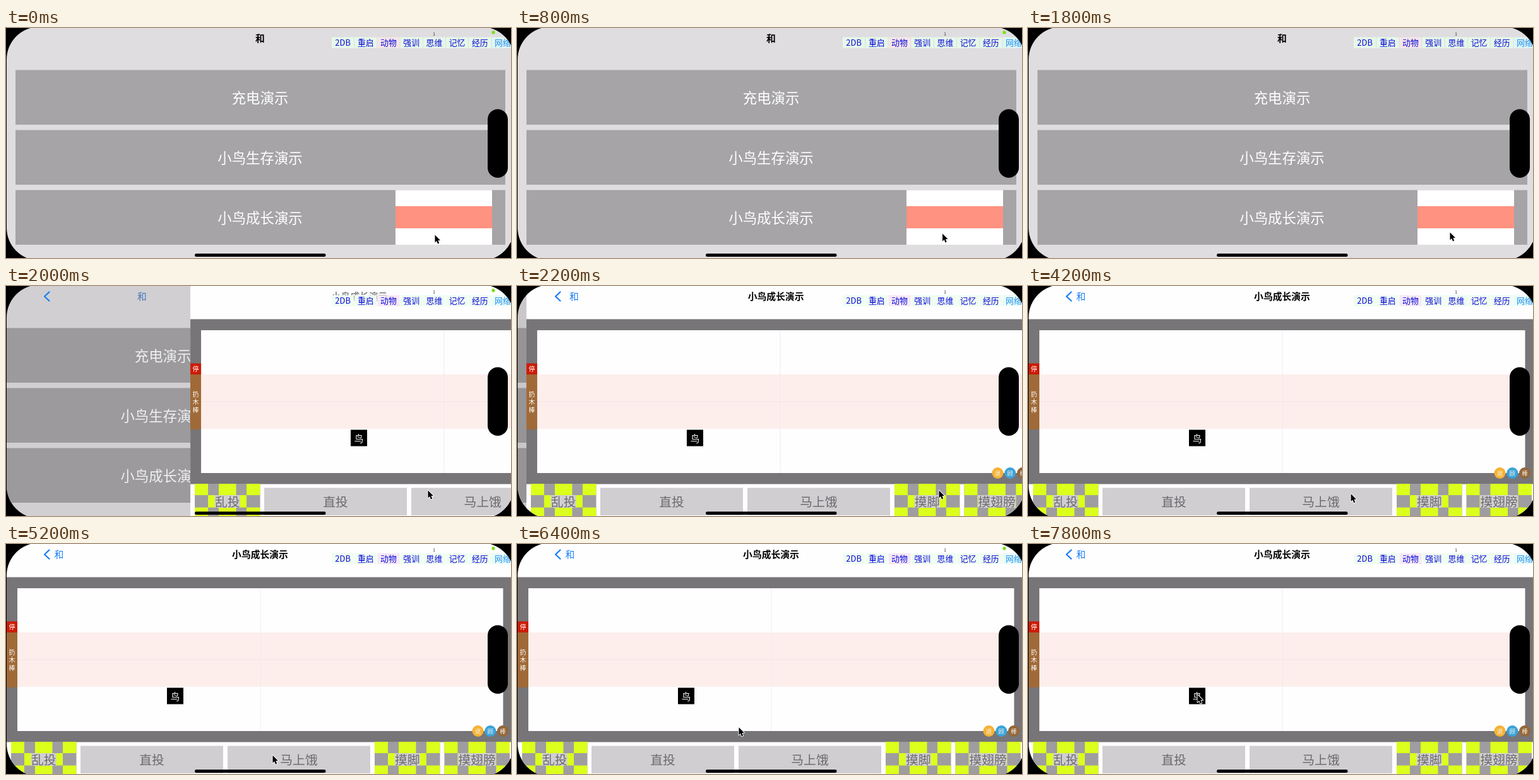
These frames come from a looping animation (800x364 px, 8000 ms). An HTML page with a canvas:

```html
<!DOCTYPE html>
<html lang="zh">
<head>
<meta charset="utf-8">
<style>
html, body { margin: 0; width: 100%; height: 100%; overflow: hidden; background: #000; }
canvas { display: block; }
</style>
</head>
<body>
<canvas id="stage" width="800" height="364"></canvas>
<script>
const ctx = document.getElementById('stage').getContext('2d');
const LOOP = 8000, STEP = 200, WIDTH = 804;
const FONT = '"Noto Sans CJK SC", "Noto Sans CJK", "Noto Sans CJK JP", sans-serif';
const BLUE = '#167df5', SILVER = '#d0ced1', LIME = '#dcff1c';

function rect(color, x, y, w, h) {
  ctx.fillStyle = color;
  ctx.fillRect(x, y, w, h);
}

function pill(x, y, w, h, r, color) {
  ctx.fillStyle = color;
  ctx.beginPath();
  ctx.roundRect(x, y, w, h, r);
  ctx.fill();
}

function disc(x, y, r, color) {
  ctx.fillStyle = color;
  ctx.beginPath();
  ctx.arc(x, y, r, 0, Math.PI * 2);
  ctx.fill();
}

// Text centred on both axes
function label(str, x, y, size, color, weight = 400) {
  ctx.font = `${weight} ${size}px ${FONT}`;
  ctx.textAlign = 'center';
  ctx.fillStyle = color;
  ctx.fillText(str, x, y + size * 0.38);
}

// Share of the push still to go: a critically damped spring
function remaining(t) {
  const k = Math.max(0, t - 1886.7) * 0.01915;
  return (1 + k) * Math.exp(-k);
}

function drawMenu(left) {
  const done = 1 - left;
  ctx.save();
  ctx.translate(-0.3 * WIDTH * done, 0);
  rect('#dfdde0', -10, 0, 1100, 364);
  ['充电演示', '小鸟生存演示', '小鸟成长演示'].forEach((name, i) => {
    const y = 66.5 + i * 95;
    rect('#a6a4a7', 15, y, 776, 86.5);
    label(name, 402.5, y + 43.5, 22.4, '#fff');
  });
  rect('#fff', 617, 256.5, 153, 86.5);
  rect('#ff9280', 617, 282, 153, 35);
  ctx.restore();
  rect(`rgba(0,0,0,${0.1 * done})`, 0, 0, 800, 364);
}

function checkButton(name, x) {
  const cols = [0, 21, 38, 65.5, 82, 103.5], rows = [313, 331, 350.5, 364];
  rect('#9f9da0', x, 313, 103.5, 51);
  for (let r = 0; r < 3; r++) {
    for (let c = r % 2; c < 5; c += 2) {
      rect(LIME, x + cols[c], rows[r], cols[c + 1] - cols[c], rows[r + 1] - rows[r]);
    }
  }
  const w = name.length * 20;
  rect(SILVER, x + 51.7 - w / 2, 331, w, 20);
  label(name, x + 51.7, 341.5, 19.8, '#6c6a6e');
}

function plainButton(name, x) {
  rect(SILVER, x, 319.5, 226, 43.5);
  label(name, x + 113, 341.5, 19.8, '#6c6a6e');
}

function drawWorld(left) {
  ctx.save();
  ctx.translate(WIDTH * left, 0);
  rect('#fffeff', 1, 0, WIDTH, 364);
  rect('#777578', 1, 52.5, WIDTH, 261);
  rect('#fffeff', 18, 70, 769.5, 226);
  rect('#fdeeec', 18, 140, 769.5, 86);
  rect('#eceaf0', 402.5, 70, 1, 226);
  rect('#f4e6e8', 18, 182.5, 769.5, 1);
  rect('#cc1c05', 1, 122.5, 17, 17.5);
  rect('#a06a38', 1, 140, 17, 87);
  label('停', 9.5, 131, 10, '#fff');
  [...'扔木棒'].forEach((ch, i) => label(ch, 9.5, 171 + i * 12.4, 10, '#fff'));
  rect('#000', 255, 227.5, 26, 26);
  label('鸟', 268, 241, 14.5, '#fff');
  checkButton('乱投', 8);
  plainButton('直投', 118);
  plainButton('马上饿', 351);
  checkButton('摸脚', 584);
  checkButton('摸翅膀', 694.5);
  [['退', '#f5b335'], ['顾', '#3ba3d8'], ['棒', '#94683a']].forEach(([ch, color], i) => {
    disc(747.5 + i * 19.8, 296, 9, color);
    label(ch, 747.5 + i * 19.8, 296, 9.5, '#f8f4ee');
  });
  ctx.restore();
}

function drawNav(left) {
  if (left === 1) {
    label('和', 402.5, 16.5, 14.8, '#000', 700);
    return;
  }
  ctx.strokeStyle = BLUE;
  ctx.lineWidth = 2.2;
  ctx.lineCap = ctx.lineJoin = 'round';
  ctx.beginPath();
  ctx.moveTo(68.5, 9.5);
  ctx.lineTo(61, 16.5);
  ctx.lineTo(68.5, 23.5);
  ctx.stroke();
  label('和', 84 + 363 * left, 16.5, 14.8, left > 0.1 ? '#4579b8' : BLUE);
  ctx.globalAlpha = Math.max(0, 1 - left * 1.5);
  label('小鸟成长演示', 402.5 + 435 * left, 16.5, 14.8, '#000', 700);
  ctx.globalAlpha = 1;
}

function drawTools(pushed) {
  const names = ['2DB', '重启', '动物', '强训', '思维', '记忆', '经历', '网络'];
  names.forEach((name, i) => {
    const x = 516 + i * 36.2;
    let color = pushed ? '#effdf1' : '#e6f8e8';
    if (i === 2) color = pushed ? '#f6e9f6' : '#f6e6e8';
    if (i === 7) color = pushed ? '#eafcf8' : '#dff5f4';
    rect(color, x, 14.5, 35.2, 17.5);
    label(name, x + 17.6, 23.3, 12.9, i === 7 ? '#2090ee' : '#0a0ad8');
  });
  label('1', 678, 10, 6.5, '#222');
}

const path = [
  [0, 679, 327], [1600, 668, 323], [2200, 668, 323], [3000, 618, 322],
  [5200, 422, 334], [7800, 268, 238]
];

function pointerAt(t) {
  const i = path.findIndex(p => p[0] > t);
  if (i < 0) return path[path.length - 1].slice(1);
  const a = path[i - 1], b = path[i], k = (t - a[0]) / (b[0] - a[0]);
  return [a[1] + (b[1] - a[1]) * k, a[2] + (b[2] - a[2]) * k];
}

function drawPointer(x, y) {
  ctx.save();
  ctx.translate(x, y);
  ctx.beginPath();
  [[0.5, 0.5], [0.5, 12.5], [3.2, 10], [5, 14.5], [7.2, 13.6], [5.4, 9.3], [9, 9]]
    .forEach(([px, py]) => ctx.lineTo(px, py));
  ctx.closePath();
  ctx.lineJoin = 'round';
  ctx.strokeStyle = '#fff';
  ctx.lineWidth = 1.8;
  ctx.stroke();
  ctx.fillStyle = '#000';
  ctx.fill();
  ctx.restore();
}

function draw(t) {
  const left = remaining(t);
  rect('#000', 0, 0, 800, 364);
  ctx.save();
  ctx.beginPath();
  ctx.roundRect(1, -2, WIDTH, 370, 52);
  ctx.clip();
  if (left > 0.001) drawMenu(left);
  if (left < 1) drawWorld(left < 0.001 ? 0 : left);
  drawNav(left);
  drawTools(left < 1);
  if (t / STEP % 2 === 0) disc(772, 7, 2.7, '#7be01c');
  pill(763, 128.5, 32, 108.5, 16, '#000');
  pill(299, 357, 207.5, 5, 2.5, '#000');
  drawPointer(...pointerAt(t));
  ctx.restore();
}

const start = performance.now();
function tick() {
  const t = (performance.now() - start) % LOOP;
  draw(Math.floor(t / STEP) * STEP);
  requestAnimationFrame(tick);
}
tick();
</script>
</body>
</html>
```
